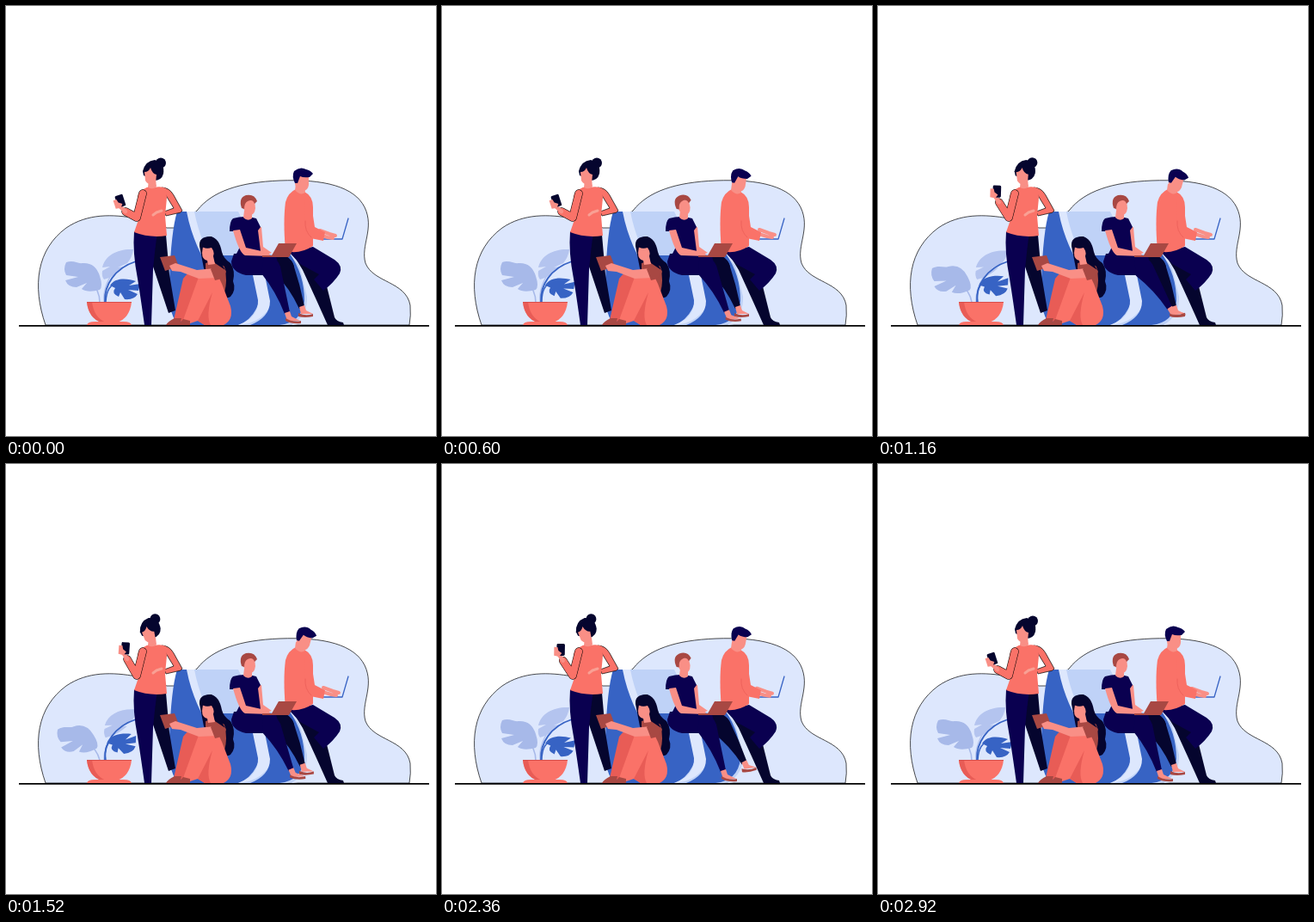
Write an HTML page that moves like this. It is 500x500 px and loops after 2960 ms.

```html
<!DOCTYPE html>
<html>
<head>
<meta charset="utf-8">
<style>
html, body { margin: 0; height: 100%; overflow: hidden; background: #fff }
svg { display: block; width: 100vw; height: 100vh }
.coral { fill: #fa7268 }
.red { fill: #e85c56 }
.skin { fill: #f98f86 }
.navy { fill: #0a0050 }
.dark { fill: #05052e }
.blue { fill: #3763c4 }
.sky { fill: #bfd2f7 }
.pale { fill: #dde7fd }
.brown { fill: #a84843 }
.leaf { fill: #a7b9e9 }
.edge { stroke: #000; stroke-width: .7 }
.line { fill: none; stroke-linecap: round; stroke-linejoin: round }
</style>
</head>
<body>
<svg viewBox="0 0 500 500">
  <path class="pale edge" d="M46 371C30 325 36 283 70 258C95 241 124 242 152 247Q170 250 187 258H197L222 238C240 215 272 205 318 203C370 201 405 210 417 234C429 259 412 278 418 299C427 322 465 320 470 348Q471 360 469 371Z"/>

  <!-- plant -->
  <g id="leafB">
    <path class="line" stroke="#b4c4ef" stroke-width="1.5" d="M114 344Q112 325 130 301"/>
    <path fill="#b4c4ef" d="M148 283C130 282 115 290 112 304L121 303L112 308Q111 314 114 318Q128 314 138 303L130 304L141 299Q147 292 148 283Z"/>
  </g>
  <g id="leafA">
    <path class="line" stroke="#a7b9e9" stroke-width="1.6" d="M109 345Q109 330 98 320"/>
    <path class="leaf" d="M70 298C79 295 83 300 89 299Q104 298 109 314Q113 326 109 330Q95 334 88 329L94 322L82 327Q72 327 69 319L84 315L70 313Q66 306 70 298Z"/>
  </g>
  <path class="line" stroke="#3763c4" stroke-width="1.8" d="M115 344C114 325 126 305 151 297"/>
  <g id="leafC">
    <path class="line" stroke="#3763c4" stroke-width="1.5" d="M116 344Q117 324 130 322"/>
    <path class="blue" d="M121 325C127 315 142 317 151 320L143 325L156 323L154 331L142 330L153 335Q149 342 138 341L133 333L131 338Q122 334 127 328Z"/>
  </g>
  <path class="coral" d="M94 344H146Q144 363 129 368H111Q96 363 94 344Z"/>
  <path class="red" d="M94 344H100Q102 362 116 368H111Q96 363 94 344Z"/>
  <path stroke="#d84f4b" d="M94 344.5H146"/>
  <path class="coral" d="M94 371Q95 367 103 367H137Q145 367 146 371Z"/>

  <!-- beanbag -->
  <path class="sky" d="M216 239H270Q281 262 300 288L330 290Q361 320 362 342Q358 371 325 371H215Z"/>
  <path class="blue" d="M199 239L211 239C216 262 232 285 244 320V371H200Q186 352 190 318Q192 262 199 239Z"/>
  <path class="pale" d="M210 239H219C224 265 233 285 246 310L242 318C227 290 216 270 210 239Z"/>
  <path class="blue" d="M243 290H282Q299 340 291 352Q284 366 270 371H240Z"/>
  <path class="pale" d="M287 313H301Q312 340 305 353Q294 369 270 371Q294 362 293 342Z"/>
  <path class="blue" d="M301 313L330 288Q347 312 347 343Q344 368 318 371H284Q307 362 307 343Z"/>
  <path class="pale" d="M339 293Q360 320 362 344Q358 369 332 371Q351 360 350 338Z"/>

  <!-- man -->
  <path class="dark" d="M334 289L356 296L373 326L382 362Q384 367 392 368L393 371H374L361 342L345 307Z"/>
  <path class="navy" d="M329 286L357 280L382 295Q392 302 388 311Q381 322 369 331L358 318L364 312L342 300Z"/>
  <path class="coral" d="M337 213L347 216Q357 221 357 234V279Q342 289 325 285Q322 250 325 228Q328 217 337 213Z"/>
  <path class="skin" d="M337 207H347L348 217Q342 221 336 214Z"/>
  <g id="manHead">
    <path class="skin" d="M337 198H352L352 208Q351 215 345 215Q337 213 336 207Z"/>
    <path class="navy" d="M336 206Q332 198 335 192Q342 186 349 190Q354 191 357 195L353 199Q346 200 342 198L339 206Z"/>
  </g>
  <path class="line" stroke="#3763c4" stroke-width="1.3" d="M398 247L391 271H369"/>
  <g id="hands">
    <path class="line" stroke="#f98f86" stroke-width="4" d="M364 266L374 269L380 270M365 261L376 265L383 267"/>
  </g>
  <path class="coral" d="M348 225Q357 230 357 244L359 257L371 263L369 273L354 270Q347 266 347 256Z"/>
  <path class="line" stroke="#e85c56" stroke-width=".7" d="M348 250Q347 262 355 269"/>

  <!-- woman with laptop -->
  <path class="dark" d="M300 290L326 291Q333 295 335 303L321 314L300 307Z"/>
  <g id="legB">
    <path class="dark" d="M312 297Q327 286 334 300Q342 324 347 349L341 352Q330 328 312 310Z"/>
    <path class="skin" d="M341 350L347 348L349 354L357 358L343 358Z"/>
    <path class="brown" d="M340 357Q348 361 357 358L357 361Q347 363 340 361Z"/>
  </g>
  <path class="navy" d="M265 288Q288 286 314 291Q318 300 311 313H279Q262 309 262 297Z"/>
  <g id="legA">
    <path class="navy" d="M300 291Q314 289 319 303L330 356L324 358Q314 332 297 311Z"/>
    <path class="skin" d="M324 357L330 355L332 361L342 366L327 366Z"/>
    <path class="brown" d="M325 363Q333 368 343 366V369Q332 370 325 366Z"/>
  </g>
  <path class="skin" d="M291 258L297 257L299 280L309 287L302 289L292 282Z"/>
  <path class="navy" d="M264 247Q278 243 291 247L296 257L293 261L296 285Q282 292 267 290L273 278L270 262H260Q260 250 264 247Z"/>
  <path class="skin" d="M264 261L272 260L279 281L306 287L307 291L278 290Q271 287 264 261Z"/>
  <path class="skin" d="M277 238H286L286 247Q281 251 276 246Z"/>
  <g id="midHead">
    <path class="skin" d="M276 226H289L290 235Q289 243 284 243Q277 241 276 234Z"/>
    <path class="brown" d="M274 235Q270 223 279 220Q289 218 292 227L289 230Q287 224 281 227Q277 229 277 236Z"/>
  </g>
  <path class="brown" d="M298 290H309L317 276H338L329 292H298Z"/>

  <!-- standing woman -->
  <path class="dark" d="M165 266H186L190 312L197 354L189 357L170 300Z"/>
  <path class="navy" d="M149 262H176Q173 285 171 306L169 371H161Q157 342 153 317Q147 287 149 262Z"/>
  <path class="coral edge" d="M181 211Q190 211 195 220L205 238Q203 241 199 241L186 244L184 239L195 235L187 222Z"/>
  <path class="coral" d="M160 213Q165 209 172 211Q180 209 186 212L187 223L185 244L187 267Q167 270 149 263L157 240L153 222Q154 215 160 213Z"/>
  <path id="armEdge" class="line" stroke="#000" stroke-width="9.400"/>
  <path id="arm" class="line" stroke="#fa7268" stroke-width="8.400"/>
  <path id="wrist" class="line" stroke="#f98f86" stroke-width="4.500"/>
  <g id="phone">
    <rect class="dark" x="0" y="-9" width="9.500" height="14" rx="1.500"/>
    <path class="skin" d="M-3 -5L1 -5L2 -1L6 2L3 6L-3 5Z"/>
  </g>
  <path class="line" stroke="#f9a094" stroke-width="3" d="M171 243L175 240L181 238"/>
  <path class="skin" d="M166 202H174L175 210Q171 214 165 211Z"/>
  <g id="head">
    <circle class="dark" cx="180" cy="182.500" r="6"/>
    <path class="dark" d="M159 192Q162 180 173 179Q185 182 183 195Q181 203 172 203L160 197Z"/>
    <path class="skin" d="M161 193Q166 193 168 188Q170 195 175 196L174 206Q166 210 162 203Z"/>
  </g>

  <!-- sitting girl -->
  <path class="dark" d="M225 279Q224 268 238 268Q248 270 251 286Q253 294 261 299Q267 308 264 320Q268 330 261 338Q254 342 247 333L230 305Z"/>
  <path class="red" d="M195 365L206 317Q212 308 224 307L233 318L209 368Z"/>
  <path class="brown" d="M232 299Q244 295 254 303Q258 319 254 333L232 320Z"/>
  <path class="coral" d="M206 365L223 318Q228 306 238 306Q245 309 251 323L261 349Q265 365 253 371H231L223 366L214 369Z"/>
  <path class="red" d="M240 333L223 366L231 371H238Q232 361 240 333Z"/>
  <path class="brown" d="M186 371Q188 367 196 363H204L202 371ZM200 371L206 364L214 366V371Z"/>
  <path class="brown" d="M179 292L196 290L201 303L185 308Z"/>
  <path class="skin" d="M190 302L197 299L222 307L243 305L245 316L224 317L203 309L193 308Z"/>
  <path class="brown" d="M241 303Q253 299 256 309Q254 317 243 319L238 306Z"/>
  <path class="skin" d="M229 280Q234 284 239 278Q243 284 241 291L243 300L235 301L234 296Q228 295 228 287Z"/>
  <path class="dark" d="M225 279Q227 268 238 268Q248 271 250 288Q249 299 255 307L243 299Q244 288 239 281Q233 283 225 279Z"/>

  <path stroke="#000" stroke-width="1.800" d="M15 371.800H492"/>
</svg>
<script>
const LOOP = 2960;
const $ = id => document.getElementById(id);
const ease = u => { u = Math.min(1, Math.max(0, u)); return u * u * (3 - 2 * u) };
// Rises from a to b, holds, then falls from c to d.
const pulse = (t, a, b, c, d) => ease((t - a) / (b - a)) - ease((t - c) / (d - c));
const mix = (p, q, k) => p.map((v, i) => v + (q[i] - v) * k);
const set = (id, name, value) => $(id).setAttribute(name, value);
const turn = (id, angle, x, y) => set(id, 'transform', `rotate(${angle} ${x} ${y})`);

function draw(t) {
  const sway = pulse(t, 600, 1500, 1700, 2360);
  turn('leafA', -14 * sway, 109, 344);
  turn('leafB', 4 * sway, 113, 344);
  turn('leafC', -11 * pulse(t, 200, 1300, 1600, 2700), 117, 344);

  turn('manHead', 15 * pulse(t, 100, 1000, 2100, 2800), 341, 213);
  const reach = pulse(t, 0, 600, 2080, 2500);
  set('hands', 'transform', `translate(${4 * reach} ${-reach})`);

  const nod = pulse(t, 100, 500, 650, 1100) + pulse(t, 2000, 2350, 2400, 2850);
  turn('midHead', -7 * nod, 281, 246);
  turn('legA', -13 * pulse(t, 300, 1100, 1160, 1760), 309, 300);
  turn('legB', -9.5 * pulse(t, 1400, 2060, 2200, 2900), 325, 297);

  turn('head', -16 * pulse(t, 1080, 1500, 2340, 2860), 169, 205);
  const lift = pulse(t, 600, 1300, 2200, 2900);
  const wrist = mix([139, 239], [141, 227], lift);
  const hand = mix([129, 230], [134, 216], lift);
  const sleeve = `M159 218L152 246L${wrist}`;
  set('armEdge', 'd', sleeve);
  set('arm', 'd', sleeve);
  set('wrist', 'd', `M${wrist}L${hand}`);
  set('phone', 'transform', `translate(${hand}) rotate(${-18 + 22 * lift})`);
}

const start = performance.now();
function tick() {
  draw((performance.now() - start) % LOOP);
  requestAnimationFrame(tick);
}
tick();
</script>
</body>
</html>
```
